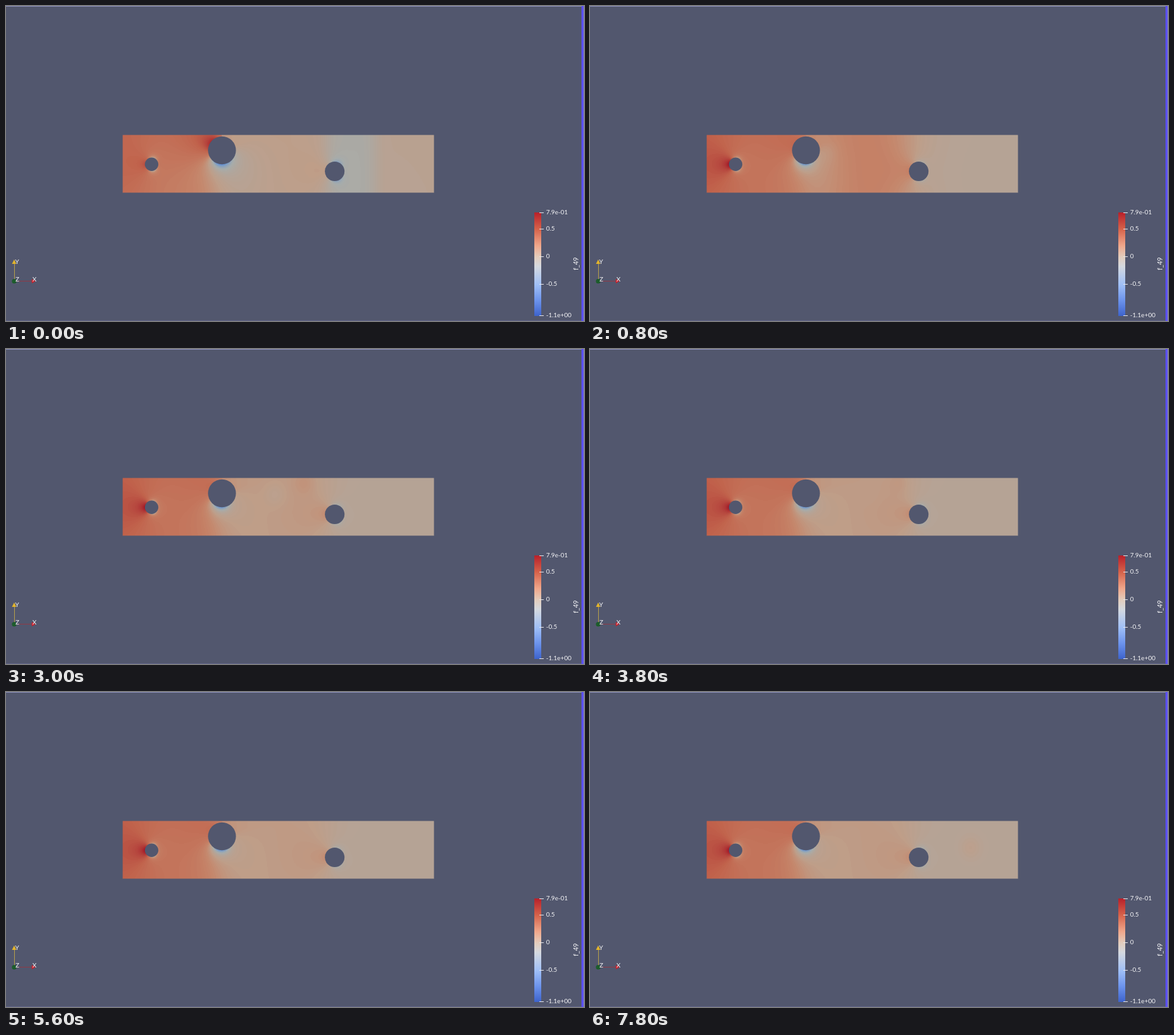
An HTML page with a canvas that plays this animation: 919x502 px, repeating every 8000 ms.

```html
<!DOCTYPE html>
<html lang="en">
<head>
<meta charset="utf-8">
<title>Pressure field</title>
<style>
  html, body { margin: 0; width: 100%; height: 100%; overflow: hidden; background: #52576e; }
  canvas { position: absolute; left: 185px; top: 205px; border-radius: 1.5px; }
  svg { position: absolute; left: 0; top: 0; }
  text { font: 10px Lato, sans-serif; fill: #f4f4f6; }
</style>
</head>
<body>
<canvas id="field" width="496" height="93"></canvas>
<svg width="919" height="502" viewBox="0 0 919 502">
  <defs><linearGradient id="bar" x2="0" y2="1"></linearGradient></defs>
  <path d="M0 .5H915" stroke="#8f93bd"/>
  <path d="M0 501.5H915" stroke="#62668a"/>
  <path d="M916.5 0V502" stroke="#5a4ff2" stroke-width="3"/>
  <path d="M918.5 0V502" stroke="#7d7ac4"/>
  <g id="cylinders" fill="#52576e"></g>
  <path d="M13.5 438V409" stroke="#b9a14a"/>
  <path d="M13 438.5H41" stroke="#8f3a46"/>
  <path d="M13 404L16.5 411H9.5Z" fill="#e2b42c"/>
  <path d="M47 438.5L41 435V442Z" fill="#c8222c"/>
  <circle cx="13" cy="438.7" r="3.6" fill="#1d5c2c"/>
  <text x="14.5" y="411">Y</text>
  <text x="42" y="439">X</text>
  <text x="15" y="438.5">Z</text>
  <rect x="840" y="329" width="11" height="165" fill="url(#bar)"/>
  <g id="ticks"></g>
  <text transform="translate(909.8 421) rotate(-90)" style="font-size:10.5px">f_49</text>
</svg>
<script>
const LOOP = 8000, STEP = 200, SETTLE = 800, DRIFT = .023;
const X0 = 185, Y0 = 205;
const canvas = document.getElementById('field');
const ctx = canvas.getContext('2d');
const W = canvas.width, H = canvas.height;
const image = ctx.createImageData(W, H);

// Pairs are [at start, once settled]; angles in degrees, clockwise from downstream
const inlet = [.42, .48];
const cylinders = [
  { x: 231.5, y: 252.3, r: 10.7, drop: [.1, .1], front: 180, hot: [.18, .38],
    sides: [75, -75], cold: [-.38, -.32], lee: 0, wake: [-.03, -.12] },
  { x: 343.4, y: 230, r: 22.2, drop: [.28, .27], front: 220, hot: [.5, .15],
    sides: [100], cold: [-.5, -.6], lee: 70, wake: [-.3, -.15] },
  { x: 522.6, y: 263.5, r: 15.6, drop: [0, .1], front: 183, hot: [.12, .15],
    sides: [75, -75], cold: [-.22, -.16], lee: 0, wake: [-.02, -.04] }
];

// Patches carried downstream, placed where they are strongest
const eddies = [
  { x: 405, y: 232, amp: -.1, at: 2000 },
  { x: 474, y: 213, amp: .06, at: 3000 },
  { x: 605, y: 248, amp: .07, at: 7800 }
];

const palette = [
  [-1, '#3054b8'], [-.45, '#7098cd'], [-.15, '#a7acaa'], [.1, '#be9e89'],
  [.25, '#c5866b'], [.5, '#c1634c'], [.85, '#a00e22']
];

const mix = (a, b, k) => a + (b - a) * k;
const clamp = (v, lo, hi) => Math.min(hi, Math.max(lo, v));
const bell = d => Math.exp(-d * d);
const smooth = k => k * k * (3 - 2 * k);

// Colour lookup, read from a painted gradient
const LEVELS = 200, LOW = -1, HIGH = .85;
const level = v => clamp((v - LOW) / (HIGH - LOW), 0, 1);
function paintRamp() {
  const ramp = Object.assign(document.createElement('canvas'), { width: LEVELS, height: 1 });
  const pen = ramp.getContext('2d');
  pen.fillStyle = pen.createLinearGradient(0, 0, LEVELS, 0);
  const gradient = pen.createLinearGradient(0, 0, LEVELS, 0);
  for (const [v, color] of palette) gradient.addColorStop(level(v), color);
  pen.fillStyle = gradient;
  pen.fillRect(0, 0, LEVELS, 1);
  return pen.getImageData(0, 0, LEVELS, 1).data;
}
const ramp = paintRamp();

// Directional lobe that fades with distance from a cylinder
function lobe(angle, amp, sharp, fade) {
  const ux = Math.cos(angle * Math.PI / 180), uy = Math.sin(angle * Math.PI / 180);
  return (nx, ny, near) => {
    const c = nx * ux + ny * uy;
    return c > 0 ? amp * c ** sharp * near ** fade : 0;
  };
}

function draw(t) {
  const settle = smooth(Math.min(1, t / SETTLE));
  const now = ([a, b]) => mix(a, b, settle);
  const bodies = cylinders.map(c => ({
    ...c,
    loss: now(c.drop),
    hotLobe: lobe(c.front, now(c.hot), 2, 1.1),
    lobes: [
      ...c.sides.map(a => lobe(a, now(c.cold), 4, 4)),
      lobe(c.lee, now(c.wake), 1, 1.5)
    ]
  }));
  const patches = eddies.map(e => ({
    x: e.x + DRIFT * (t - e.at), y: e.y, amp: e.amp * bell((t - e.at) / 1200)
  }));
  const surge = .17 * bell((t - SETTLE) / 700);
  const trough = -.15 * (1 - settle);

  for (let i = 0; i < W; i++) {
    const x = i + X0 + .5;
    let base = now(inlet) + surge * bell((x - 440) / 80) + trough * bell(((x - 548) / 42) ** 2);
    for (const b of bodies) base -= b.loss * (1 + Math.tanh((x - b.x + 8) / 30)) / 2;

    for (let j = 0; j < H; j++) {
      const y = j + Y0 + .5;
      let v = base;
      for (const b of bodies) {
        const dx = x - b.x, dy = y - b.y, d = Math.max(Math.hypot(dx, dy), b.r * .9);
        const nx = dx / d, ny = dy / d, near = b.r / d;
        if (dx < 0) v += b.hotLobe(nx, ny, near);
        for (const f of b.lobes) v += f(nx, ny, near);
      }
      for (const p of patches) v += p.amp * bell((x - p.x) / 16) * bell((y - p.y) / 18);

      const at = (j * W + i) * 4, from = Math.round(level(v) * (LEVELS - 1)) * 4;
      for (let q = 0; q < 3; q++) image.data[at + q] = ramp[from + q];
      const rim = i === 0 || j === 0 || i === W - 1 || j === H - 1;
      image.data[at + 3] = rim ? 120 : 255;
    }
  }
  ctx.putImageData(image, 0, 0);
}

const fill = (id, list, item) => {
  document.getElementById(id).innerHTML = list.map(item).join('');
};

fill('cylinders', cylinders, c => `<circle cx="${c.x}" cy="${c.y}" r="${c.r}"/>`);

fill('bar', [
  [0, '#b8202a'], [16, '#d6624a'], [32, '#f0a78b'], [43, '#e3cdbd'],
  [52, '#d5d9df'], [70, '#9fbff7'], [85, '#6c93ec'], [100, '#3d63cc']
], ([at, color]) => `<stop offset="${at}%" stop-color="${color}"/>`);

fill('ticks', [
  [329.5, '7.9e-01'], [355.5, '0.5'], [399.5, '0'], [443.5, '-0.5'], [493.5, '-1.1e+00']
], ([y, label]) =>
  `<path d="M848 ${y}H855" stroke="#e8e8ec"/><text x="858.7" y="${y + 2.5}">${label}</text>`);

let shown = -1;
const start = performance.now();
function tick() {
  const t = Math.floor((performance.now() - start) % LOOP / STEP) * STEP;
  if (t !== shown) draw(shown = t);
  requestAnimationFrame(tick);
}
tick();
</script>
</body>
</html>
```
